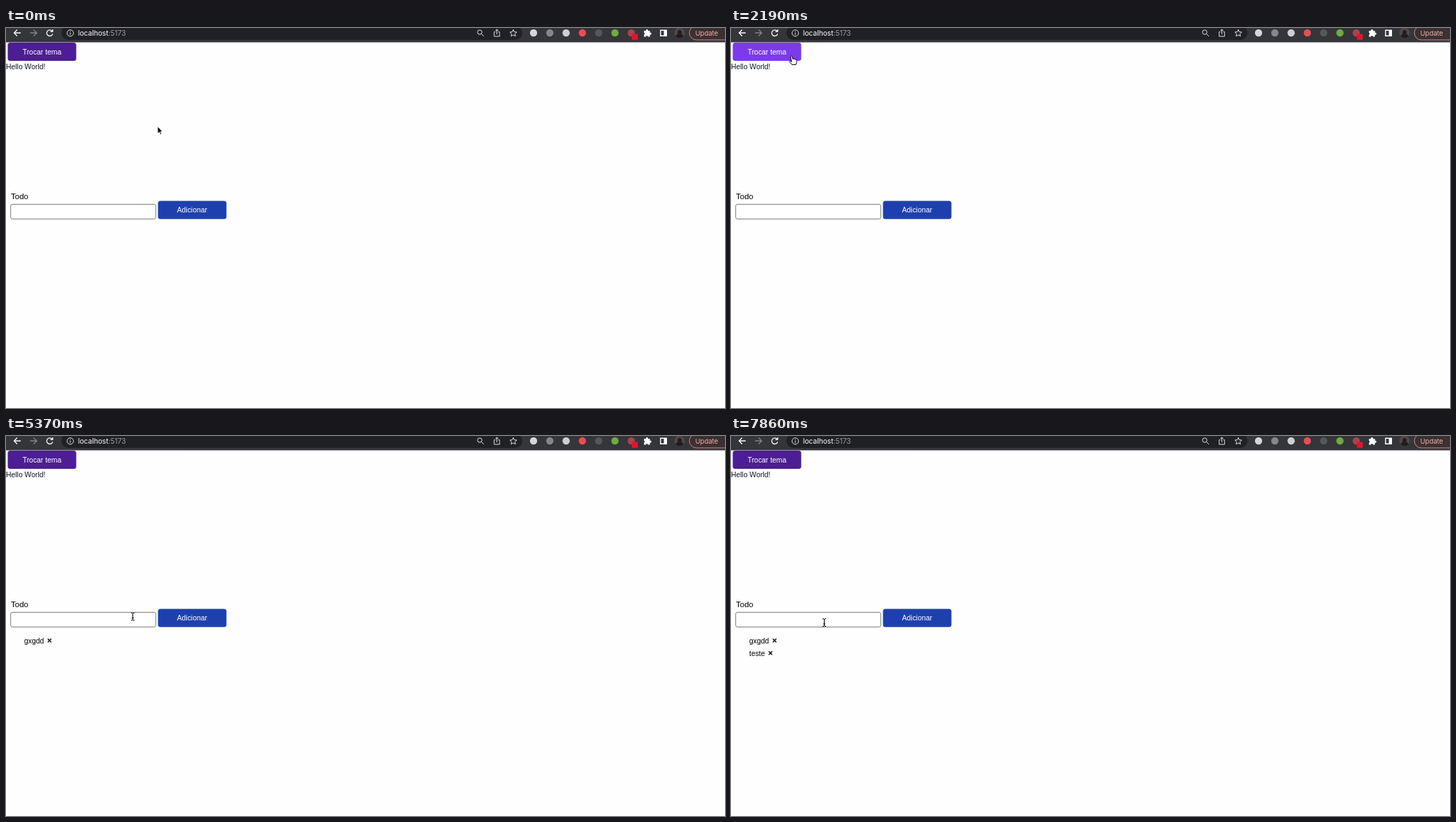
Write an HTML page that moves like this. It is 1029 px wide and 544 px high and loops after 8 s.

```html
<!DOCTYPE html>
<html lang="pt">
<meta charset="utf-8">
<title>Todo</title>
<style>
  html, body { margin: 0; height: 100%; overflow: hidden; background: #fefefe }
  svg { display: block; width: 100%; height: 100% }
  text { font: 10.4px "Liberation Sans", Arial, sans-serif }
  .bar text { font-family: Inter, sans-serif }
  .line { fill: none; stroke: #dfe0e3; stroke-width: 1.3 }
  .mid { text-anchor: middle; fill: #fff }
  .cross { stroke: #000; stroke-width: 1.4 }
</style>
<svg viewBox="0 0 1029 544">
  <rect width="1029" height="544" fill="#fefefe"/>

  <g class="bar">
    <rect width="1029" height="20.5" fill="#35363a"/>
    <rect x="79" y="-3" width="660" height="20" rx="10" fill="#202124"/>
    <path class="line" style="stroke:#fff" d="M21 7H12M16 2.5L11.5 7 16 11.5"/>
    <path class="line" style="stroke:#85868a" d="M34.5 7H43.5M39.5 2.5L44 7 39.5 11.5"/>
    <path class="line" style="stroke:#fff" d="M66 4.5A4.3 4.3 0 1 0 66.7 8.5M66.8 2V5.2H63.4"/>
    <g class="line" style="stroke-width:1">
      <circle cx="92" cy="7.3" r="4.6"/>
      <path d="M92 6.5V10M92 4.4V5.5"/>
      <circle cx="678" cy="6" r="3.2"/>
      <path d="M680.5 8.5L684 12M700.5 5.5H698.7V12H706.3V5.5H704.5M702.5 9V2M700.3 4L702.5 1.8 704.7 4"/>
      <path d="M726 2.3L727.4 5.6 731 5.9 728.3 8.3 729.1 11.8 726 9.9 722.9 11.8 723.7 8.3 721 5.9 724.6 5.6Z"/>
    </g>
    <text x="103" y="11" style="font-size:10.2px" fill="#9aa0a6"><tspan fill="#fff">localhost</tspan>:5173</text>
    <g id="extensions"></g>
    <rect x="895.7" y="8.5" width="8.6" height="8.6" rx="1" fill="#e8112d"/>
    <path fill="#fff" d="M913 4H915.8A1.6 1.6 0 1 1 918.8 4H921.5V6.6A1.6 1.6 0 1 1 921.5 9.6V12.5H918.8A1.5 1.5 0 0 0 915.8 12.5H913V9.6A1.5 1.5 0 0 0 913 6.7Z"/>
    <path fill="#fff" fill-rule="evenodd" d="M936 2.5H946V12H936ZM937.4 3.9V10.6H941.5V3.9Z"/>
    <circle cx="964" cy="7" r="7.5" fill="#51484a"/>
    <path fill="#211d1f" d="M958.5 12Q959 8.8 962 8.3A3 3 0 1 1 966 8.3Q969 8.8 969.5 12A7.5 7.5 0 0 1 958.5 12"/>
    <rect x="978" y="-3" width="64" height="20" rx="10" fill="#3b3032" stroke="#d9857e"/>
    <text x="986.5" y="11" style="font-size:9.5px" fill="#f4b0aa">Update</text>
  </g>

  <g id="dark">
    <rect y="47" width="1029" height="173" fill="#111827"/>
    <rect y="215.5" width="1029" height="4.5" fill="#0d1420"/>
  </g>
  <rect id="theme" x="2.5" y="21" width="98" height="26" rx="3.5"/>
  <text class="mid" x="51.5" y="37.8">Trocar tema</text>
  <text id="hello" y="58.5">Hello World!</text>

  <text x="7" y="244.5" style="font-size:11.5px">Todo</text>
  <rect id="field" x="6.7" y="252.4" width="207.6" height="21" rx="2.5" fill="#fff"/>
  <text id="typed" x="8" y="266" style="font-size:8.8px"></text>
  <path id="caret" stroke="#000" stroke-width=".9" d="M0 258V267.5"/>
  <rect id="add" x="217.5" y="247.5" width="98" height="26" rx="3.5"/>
  <text class="mid" x="266.3" y="264.2">Adicionar</text>

  <g id="item1"><text x="26" y="296.8">gxgdd</text><path class="cross" d="M59.8 290.2L64.8 295.2M64.8 290.2L59.8 295.2"/></g>
  <g id="item2"><text x="26" y="314.8">teste</text><path class="cross" d="M54 308.2L59 313.2M59 308.2L54 313.2"/></g>

  <g id="cursor" stroke-linejoin="round">
    <path id="arrow" stroke="#fff" stroke-width=".8" d="M0 0V10.2L2.4 8 4 11.6 5.6 10.9 4 7.4H7Z"/>
    <path id="hand" fill="#fff" stroke="#000" d="M-2.2 .6C-2.4 -.8 -.4 -1 0 .4L1 4C1.8 3.2 2.8 3.4 3 4.2 3.8 3.6 4.8 4 4.9 4.8 5.8 4.5 6.6 5 6.6 6L6.4 9 5.4 12H-.2L-3.6 8C-4.2 7 -3 6.4 -2.2 7L-.8 8Z"/>
    <path id="beam" fill="none" stroke="#000" d="M-2.5 -5.5Q0 -5.5 0 -4V4Q0 5.5 -2.5 5.5M2.5 -5.5Q0 -5.5 0 -4M2.5 5.5Q0 5.5 0 4M-1.5 2H1.5"/>
  </g>
</svg>
<script>
const $ = id => document.getElementById(id);
const show = (id, on) => $(id).style.display = on ? '' : 'none';
const within = (t, from, to) => t >= from && t < to;

['#d5d6d8', '#85878a', '#cfcfcf', '#ee4b52', '#55575a', '#6fae3c', '#a9444c'].forEach((fill, i) =>
  $('extensions').innerHTML += `<circle cx="${755 + i * 23.3}" cy="7" r="5.2" fill="${fill}"/>`);

// Pointer moves: first step, last step, step count, Bezier points after the current place
const start = [217, 141];
const moves = [
  [150, 840, 9, [87.5, 40.5]],
  [2730, 3260, 7, [116.5, 256.5]],
  [3965, 4320, 5, [225.5, 270.5]],
  [4405, 4580, 3, [228, 267]],
  [5110, 5370, 4, [181.5, 258.5]],
  [6260, 6790, 7, [230.5, 263.5]],
  [7320, 7860, 7, [215, 305], [75, 300], [133.5, 267]]
];
// Typed words: focus, blur, clear, key times
const words = [
  ['gxgdd', 3520, 4840, 4930, [3790, 3880, 4055, 4230, 4405]],
  ['teste', 5640, 7050, 7050, [5910, 6000, 6090, 6260, 6350]]
];

function bezier(points, u) {
  while (points.length > 1)
    points = points.slice(1).map((p, i) => p.map((v, k) => points[i][k] + (v - points[i][k]) * u));
  return points[0];
}

function pointer(t) {
  let at = start;
  for (const [from, to, count, ...path] of moves) {
    if (t < from) break;
    const step = Math.floor((t - from) / (to - from) * (count - 1) + 1e-6) + 1;
    const u = Math.min(1, step / count);
    at = bezier([at, ...path], u * u * (3 - 2 * u));
  }
  return at;
}

function hit(id, [x, y]) {
  const { x: bx, y: by, width, height } = $(id).getBBox();
  return within(x, bx, bx + width) && within(y, by, by + height);
}

function draw(t) {
  const at = pointer(t);
  const onTheme = hit('theme', at), onAdd = hit('add', at), onField = hit('field', at);
  $('cursor').setAttribute('transform', `translate(${at})`);
  show('hand', onTheme || onAdd);
  show('beam', onField);
  show('arrow', !onTheme && !onAdd && !onField);
  $('theme').setAttribute('fill', onTheme ? '#7c3aed' : '#4c1d95');
  $('add').setAttribute('fill', onAdd ? '#2563eb' : '#1e40af');

  const dark = within(t, 1290, 2190);
  show('dark', dark);
  $('hello').setAttribute('fill', dark ? '#fff' : '#111827');

  let text = '', focused = false, lastKey = 0;
  words.forEach(([word, focus, blur, clear, keys], i) => {
    show('item' + (i + 1), t >= clear);
    if (!within(t, focus, clear)) return;
    const count = keys.filter(k => k <= t).length;
    text = word.slice(0, count);
    focused = t < blur;
    lastKey = count ? keys[count - 1] : focus;
  });
  $('typed').textContent = text;
  $('field').setAttribute('stroke', focused ? '#1768c9' : '#6b6b6b');
  $('field').setAttribute('stroke-width', focused ? 1.8 : .9);
  show('caret', focused && Math.floor((t - lastKey) / 440) % 2 === 0);
  const end = text ? $('typed').getComputedTextLength() : 0;
  $('caret').setAttribute('transform', `translate(${8.4 + end})`);
}

const began = performance.now();
function frame() {
  draw((performance.now() - began) % 8000);
  requestAnimationFrame(frame);
}
frame();
</script>
</html>
```
